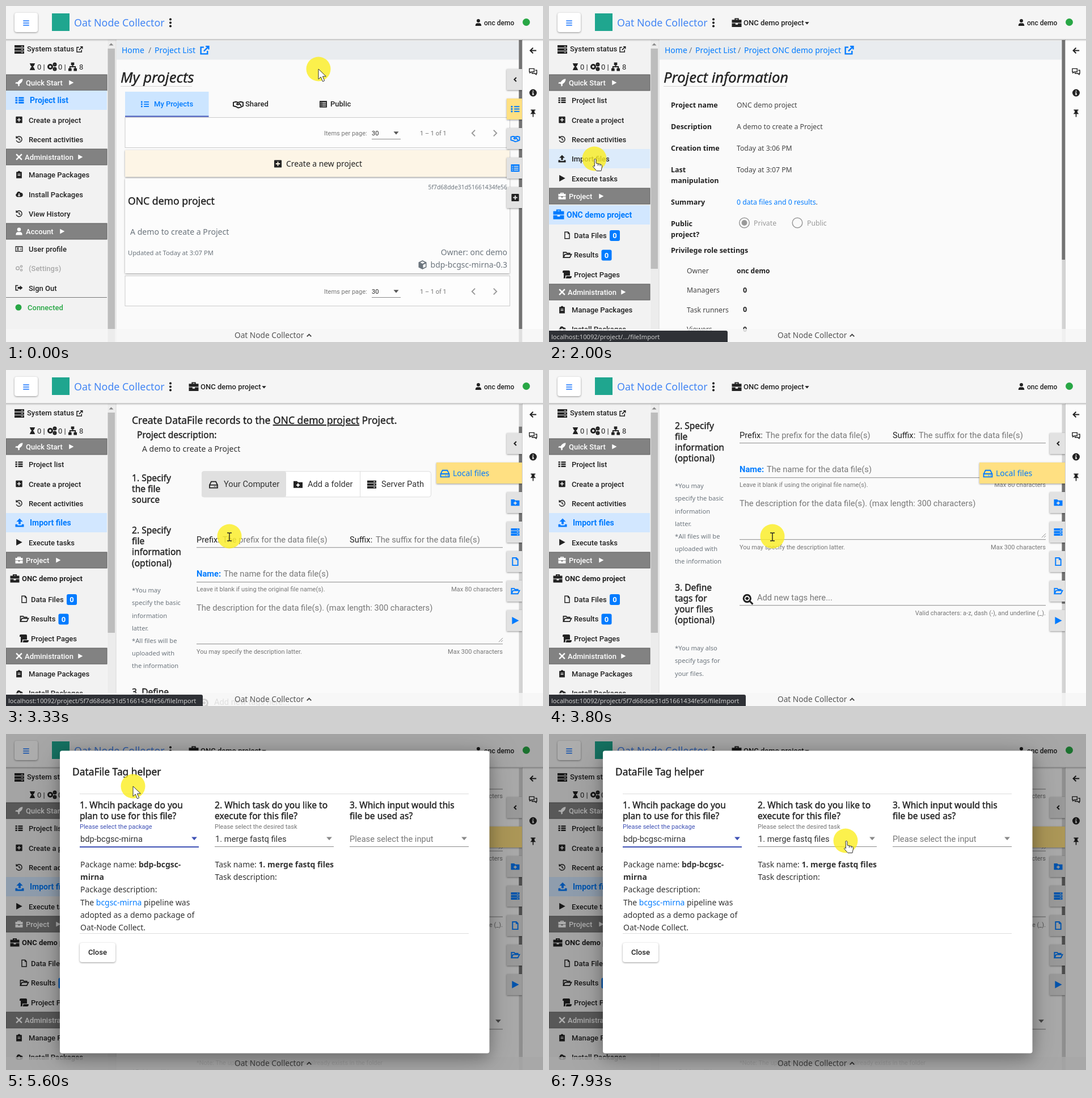
Recreate the animation shown at these times as an HTML page. Size 947x592 px, loop 8000 ms.

```html
<!DOCTYPE html>
<html lang="en">
<head>
<meta charset="utf-8">
<title>Project walkthrough</title>
<style>
html,body{margin:0;width:100%;height:100%;overflow:hidden;background:#fafafa}
svg{display:block;width:947px;height:592px}
text{white-space:pre}
.r{font-family:Roboto,sans-serif}
.n{font-family:'Noto Sans',sans-serif}
.sh{filter:drop-shadow(0 1px 1.5px rgba(0,0,0,.4))}
.deep{filter:drop-shadow(0 7px 12px rgba(0,0,0,.26)) drop-shadow(0 8px 28px rgba(0,0,0,.2))}
</style>
</head>
<body>
<svg id="stage" viewBox="0 0 947 592"></svg>
<script>
const BLUE = '#007bff', INK = '#222', GREY = '#6c757d', INDIGO = '#3f51b5';
const APP = 'Oat Node Collector', USER = 'onc demo', PROJECT = 'ONC demo project';
const STEP = 200 / 3, LOOP = 8000;

// Icons live in a 16 x 16 box
const SOLID = {
  list: 'M0 2h4v3H0zM6 2h10v3H6zM0 6.5h4v3H0zM6 6.5h10v3H6zM0 11h4v3H0zM6 11h10v3H6z',
  ul: 'M0 2h3v3H0zM6 2.5h10v2H6zM0 6.5h3v3H0zM6 7h10v2H6zM0 11h3v3H0zM6 11.5h10v2H6z',
  plus: 'M1 2q0-1 1-1h12q1 0 1 1v12q0 1-1 1H2q-1 0-1-1zM7 4v3H4v2h3v3h2V9h3V7H9V4z',
  clip: 'M2 2h3q1-2 3-2t3 2h3v14H2zM5 6v1.5h6V6zM5 9v1.500h6V9z',
  cloud: 'M4 14a4 4 0 0 1-1-7.5a4.500 4.500 0 0 1 8.500-1.500a4.500 4.500 0 0 1 .5 9zM7 6v4H4.500L8 13l3.500-3H9V6z',
  user: 'M8 0a4 4 0 0 1 0 8a4 4 0 0 1 0-8zM1 16q0-6 4-6.500h6q4 .5 4 6.500z',
  card: 'M0 2h16v12H0zM1.500 4v8.500h13V4zM3 11q0-2 2.500-2t2.500 2zM5.500 5a1.700 1.700 0 0 1 0 3.400a1.700 1.700 0 0 1 0-3.400zM10 6h3.500v1H10zM10 9h3.500v1H10z',
  out: 'M0 2h6v2H2v8h4v2H0zM5 6h5V3l6 5-6 5v-3H5z',
  server: 'M0 1h16v4H0zM0 6h16v4H0zM0 11h16v4H0zM11 2.500v1h3v-1zM11 7.500v1h3v-1zM11 12.500v1h3v-1z',
  hour: 'M2 0h12v2h-1q0 4-3.500 6q3.500 2 3.500 6h1v2H2v-2h1q0-4 3.500-6Q3 6 3 2H2z',
  net: 'M5 0h6v5H9v2h5v4h2v5h-6v-5h2V9H4v2h2v5H0v-5h2V7h5V5H5z',
  rocket: 'M16 0q0 7-7 11v4l-3 1v-4l-2-2H0l1-3h4Q9 0 16 0z',
  upload: 'M6 11V6H2l6-6 6 6h-4v5zM0 11h4v2h8v-2h4v5H0z',
  play: 'M2 1l13 7L2 15z',
  brief: 'M4.500 3V.5h7V3H16v5H0V3zM6.500 3h3v-.8h-3zM0 9h6v2h4V9h6v6H0z',
  scroll: 'M0 3q0-2 2-2h9q2 0 2 2v7H5v3q0 2-2 2t-1-2V5H0zM6.500 11H16q0 4-3 4H5q1.500-1 1.500-4z',
  cube: 'M8 0l7 3.500v9L8 16l-7-3.500v-9zM8 2L4 4l4 2 4-2zM9 8v5.500l4.500-2V6z',
  fplus: 'M0 2h6l2 2h8v10H0zM7 6v2H5v2h2v2h2v-2h2V8H9V6z',
  info: 'M8 0a8 8 0 0 1 0 16a8 8 0 0 1 0-16zM7 3v2.500h2V3zM6 7v1.500h1V11H6v1.500h4V11H9V7z',
  pin: 'M3 0h10v2h-2v4l3 3.500H9V16H7V9.500H2L5 6V2H3z',
  alt: 'M0 1h16v14H0zM2 4v1.500h2V4zM5.500 4v1.500H14V4zM2 7.500V9h2V7.500zM5.500 7.500V9H14V7.500zM2 11v1.500h2V11zM5.500 11v1.500H14V11z',
  down: 'M2 5h12L8 12z'
};
const LINE = {
  ext: 'M7 3H2v11h11V9M10 1.500h5v5M15 1.500L7 9.500',
  hist: 'M3 4a6.300 6.300 0 1 1-1 6M2 1v4h4M8 4.500V8l3 2',
  file: 'M3 1h7l3 3v11H3zM10 1v3h3',
  open: 'M1 13V3h5l1.500 2H13v2M1 13l3-6h12l-3 6z',
  hdd: 'M1 9h14v5H1zM1 9l3-6h8l3 6M9 11.500h1M12 11.500h1',
  hand: 'M0 5l4-1 4 1 4-1 4 1v6l-4 2-4 1-4-2-4-1zM8 5L5.500 8l2 1L10 7l3 4',
  cogs: 'M1.500 8a3.500 3.500 0 1 0 7 0a3.500 3.500 0 1 0-7 0M11 4a2 2 0 1 0 4 0a2 2 0 1 0-4 0M11 12a2 2 0 1 0 4 0a2 2 0 1 0-4 0',
  tools: 'M2 2l12 12M14 2L2 14',
  chat: 'M1 2h9v6H5l-3 2V8H1zM12 5h3v6h-1v2l-3-2H6V9',
  left: 'M15 8H2M8 2L2 8l6 6',
  prev: 'M10 3L5 8l5 5', next: 'M6 3l5 5-5 5', up: 'M2 11l6-6 6 6',
  zoom: 'M1 6.500a5.500 5.500 0 1 0 11 0a5.500 5.500 0 1 0-11 0M10.500 10.500l5 5M4 6.500h5M6.500 4v5',
  bars: 'M1 3h14M1 8h14M1 13h14'
};

const text = (cls, x, y, s, size, fill, w, more) =>
  `<text class="${cls}" x="${x}" y="${y}" font-size="${size}" fill="${fill}" font-weight="${w}" ${more}>${s}</text>`;
const R = (x, y, s, size = 13, fill = INK, w = 500, more = '') => text('r', x, y, s, size, fill, w, more);
const N = (x, y, s, size = 14, fill = INK, w = 400, more = '') => text('n', x, y, s, size, fill, w, more);
// Medium weight: regular with a thin outline
const M = (x, y, s, size, more = '') => N(x, y, s, size, INK, 400, `stroke="${INK}" stroke-width=".4" ${more}`);
const END = 'text-anchor="end"';
const box = (x, y, w, h, fill, more = '') => `<rect x="${x}" y="${y}" width="${w}" height="${h}" fill="${fill}" ${more}/>`;
const rule = (x, y, x2, fill = '#8a8a8a', h = 1) => box(x, y, x2 - x, h, fill);
const dot = (x, y, r, fill, more = '') => `<circle cx="${x}" cy="${y}" r="${r}" fill="${fill}" ${more}/>`;
const group = (id, body, more = '') => `<g id="${id}" ${more}>${body}</g>`;
const lines = (x, y, gap, rows, draw) => rows.map((s, i) => draw(x, y + i * gap, s)).join('');
function icon(name, cx, cy, size = 14, color = INK, sw = 1.8) {
  const at = `transform="translate(${cx - size / 2} ${cy - size / 2}) scale(${size / 16})"`;
  return SOLID[name] ? `<path d="${SOLID[name]}" ${at} fill="${color}" fill-rule="evenodd"/>`
    : `<path d="${LINE[name]}" ${at} fill="none" stroke="${color}" stroke-width="${sw}"/>`;
}

// Sidebar
const item = (y, name, label, color = INK) => icon(name, 23, y, 13, color) + R(40, y + 5, label, 13, color);
const bar = (y, name, label, tip, x = 35) => box(0, y - 14, 178, 28, '#828282', 'stroke="#5d5d5d"') +
  icon(name, 23, y, 13, '#fff', 3) + R(x, y + 5, label, 13, '#fff') + icon('play', tip + 4, y, 10, '#fff');
const active = (y, name, label, bg = '#d2e7ff') => box(0, y - 17, 178, 34, bg) +
  icon(name, 24, y, 15, BLUE) + R(42, y + 5, label, 14, BLUE, 700);
const badge = x => box(x, 395, 18, 19, BLUE, 'rx="3"') + R(x + 9, 409, '0', 13, '#fff', 700, 'text-anchor="middle"');
const quick = item(200.5, 'plus', 'Create a project') + item(235, 'hist', 'Recent activities');

const sideTop = icon('server', 23.5, 76.5, 17) + R(37, 80, 'System status') + icon('ext', 129.500, 76.5, 12, INK, 2) +
  icon('hour', 46.5, 107, 12) + R(55, 112, '0 |', 13, INK, 400) + icon('cogs', 81, 107, 16, INK, 3) +
  R(92, 112, '0 |', 13, INK, 400) + icon('net', 117.5, 107, 15) + R(129, 112, '8', 13, INK, 400) +
  bar(135, 'rocket', 'Quick Start', 111);
const sideList = active(166, 'list', 'Project list') + quick +
  bar(266, 'tools', 'Administration', 127, 33) + item(297, 'clip', 'Manage Packages') +
  item(331.5, 'cloud', 'Install Packages') + item(366, 'hist', 'View History') +
  bar(397, 'user', 'Account', 95) + item(428, 'card', 'User profile') +
  item(462, 'cogs', '(Settings)', '#a9a9a9') + item(496.5, 'out', 'Sign Out') +
  rule(0, 513, 178, '#777') + dot(22, 531, 5.5, '#28a745') + R(38, 536, 'Connected', 13, '#28a745') +
  box(179.500, 75, 12.5, 517, '#bdbdbd');
const sideProject = item(166, 'list', 'Project list') + quick +
  item(303.5, 'play', 'Execute tasks') + bar(335, 'brief', 'Project', 88) +
  icon('file', 32, 404, 13) + R(44, 409, 'Data Files') + badge(107) +
  icon('open', 32, 438.5, 15) + R(44, 443, 'Results') + `<g transform="translate(0 34.500)">${badge(92.500)}</g>` +
  icon('scroll', 32, 473, 16) + R(44, 477.5, 'Project Pages') +
  bar(504, 'tools', 'Administration', 127, 33) + item(535, 'clip', 'Manage Packages') + item(569, 'cloud', 'Install Packages') +
  box(179.500, 75, 12.5, 388, '#bdbdbd');
const sideInfo = group('hover', box(0, 252, 178, 34, '#dcebfb')) + item(269, 'upload', 'Import files') +
  box(0, 351, 178, 34, '#d2e7ff') + icon('brief', 17, 367.5, 19, BLUE) + R(31, 373, PROJECT, 14, BLUE, 700);
const sideImport = active(269, 'upload', 'Import files', '#d2e7ff" id="lit') +
  icon('brief', 15.5, 367.5, 16) + R(28, 372, PROJECT, 13, INK, 700);

// Pages
const crumbs = (parts, extX) => box(195, 62, 710, 32.5, '#e9ecef') +
  parts.map(([x, s], i) => (i ? N(x - 11, 83, '/', 14, GREY) : '') + N(x, 83, s, 14, BLUE)).join('') +
  icon('ext', extX, 78, 17, BLUE, 2.2);
const heading = (x, y, s, end) => M(x, y, s, 25.6, 'font-style="italic"') + rule(x, y + 6, end, '#d5d5d5');
const pager = y => box(210, y, 678.500, 53, '#fdfdfd', 'stroke="#ccc"') + R(561, y + 31, 'Items per page:', 11, '#757575', 400) +
  R(645, y + 31, '30', 11, INK, 400) + rule(645, y + 37.5, 696) + icon('down', 688, y + 27, 12, '#555') +
  R(730, y + 31, '1 – 1 of 1', 11, '#757575', 400) + icon('prev', 825, y + 27.5, 17, '#999') + icon('next', 862, y + 27.5, 17, '#999');

const pageList = crumbs([[204, 'Home'], [262, 'Project List']], 350) + heading(202, 135, 'My projects', 328) +
  box(210, 151, 147.5, 44, '#cce5ff') + rule(210, 193.5, 357.5, INDIGO, 2) +
  icon('ul', 245, 173, 14, BLUE) + R(261, 177, 'My Projects', 13, BLUE) +
  icon('hand', 409.5, 173, 17) + R(422, 177, 'Shared') + icon('alt', 559.5, 173, 13) + R(572, 177, 'Public') + pager(196.5) +
  box(210, 254, 678, 47, '#fdf5e6', 'class="sh"') + icon('plus', 479.5, 278, 15) + N(494, 283, 'Create a new project', 13.9) +
  box(210, 304, 678, 167, '#fcfcfc', 'class="sh"') + N(884, 323, '5f7d68dde31d51661434fe56', 10.4, GREY, 400, END) +
  M(215, 350, PROJECT, 17.6) + N(219, 403, 'A demo to create a Project', 14.1, GREY) +
  N(215, 439, 'Updated at Today at 3:07 PM', 11.2, GREY) + N(884, 439, 'Owner: ' + USER, 14, GREY, 400, END) +
  N(884, 461, 'bdp-bcgsc-mirna-0.3', 14, GREY, 400, END) + icon('cube', 734.5, 456, 16, GREY) + pager(475.5);

const label = (x, y, s) => N(x, y, s, 12.5, INK, 600);
const value = (x, y, s, c = '#444') => N(x, y, s, 12.25, c);
const radio = x => dot(x, 382, 8.8, 'none', 'stroke="#999" stroke-width="1.5"');
const pageInfo = crumbs([[204, 'Home'], [258, 'Project List'], [344, 'Project ' + PROJECT]], 529) +
  heading(202, 135, 'Project information', 418) +
  lines(215, 179, 38, ['Project name', 'Description', 'Creation time', 'Last'], label) + label(215, 312, 'manipulation') +
  lines(331, 179, 38, [PROJECT, 'A demo to create a Project', 'Today at 3:06 PM', 'Today at 3:07 PM'], value) +
  label(215, 350, 'Summary') + value(331, 350, '0 data files and 0 results<tspan fill="#444">.</tspan>', BLUE) +
  label(215, 388, 'Public') + label(215, 407, 'project?') + radio(344.500) + dot(344.500, 382, 5, '#999') +
  value(361, 387, 'Private', '#999') + radio(438) + value(455, 387, 'Public', '#999') +
  label(215, 435, 'Privilege role settings') +
  lines(243, 471, 34.4, ['Owner', 'Managers', 'Task runners', 'Viewers'], (x, y, s) => value(x, y, s)) +
  N(331, 470.5, USER, 12, INK, 600) + lines(342, 505, 34.4, ['0', '0', '0'], label);

const step = (y, rows) => lines(222, y, 19.1, rows, (x, y, s) => M(x, y, s, 15.6));
const note = (y, rows) => lines(222, y, 22.2, rows, (x, y, s) => N(x, y, s, 11.15, GREY));
const field = (x, y, s) => R(x, y, s, 14.7, '#777', 400);
const hint = (y, s, right) => R(336, y, s, 11, '#777', 400) + R(876, y, right, 11, '#777', 400, END);
const choice = (ix, x, name, s) => icon(name, ix, 295.5, 16) + R(x, 300, s, 14.7, '#333', 400);
const pageImport = crumbs([[204, 'Home'], [258, 'Project List'], [344, 'Project : ' + PROJECT], [535, 'Import Files']], 628) +
  heading(208, 143, 'Import Files', 340) +
  M(222, 189, `Create DataFile records to the <tspan text-decoration="underline">${PROJECT}</tspan> Project.`, 17.5) +
  M(231, 214, 'Project description:', 15.5) + N(240, 238, 'A demo to create a Project', 14, '#333') +
  step(290, ['1. Specify', 'the file', 'source']) +
  box(345.500, 272.5, 404, 45, '#fff', 'rx="4" stroke="#ddd"') + box(345, 272, 149, 46, '#e0e0e0', 'rx="4"') + box(624, 272, 1, 46, '#ddd') +
  choice(366, 384, 'hdd', 'Your Computer') + choice(515, 532, 'fplus', 'Add a folder') + choice(645, 662, 'server', 'Server Path') +
  step(382, ['2. Specify', 'file', 'information', '(optional)']) +
  R(336, 398, 'Prefix:', 14.7, INK, 400) + field(382, 398, 'The prefix for the data file(s)') +
  R(606, 398, 'Suffix:', 14.7, INK, 400) + field(652, 398, 'The suffix for the data file(s)') + rule(336, 406, 876) +
  R(336, 458, 'Name:', 14.7, BLUE, 700) + field(384, 458, 'The name for the data file(s)') + rule(336, 467, 876) +
  hint(483.5, 'Leave it blank if using the original file name(s).', 'Max 80 characters') +
  note(486, ['*You may', 'specify the basic', 'information', 'latter.', '*All files will be', 'uploaded with', 'the information']) +
  field(336, 518, 'The description for the data file(s). (max length: 300 characters)') + rule(336, 576, 876) +
  '<path d="M869 573l7-7M873 573l3-3" stroke="#888"/>' + hint(593.5, 'You may specify the description latter.', 'Max 300 characters') +
  step(667, ['3. Define', 'tags for', 'your files', '(optional)']) + icon('zoom', 351, 682, 18, INK, 2.6) +
  group('press', box(335.500, 668.5, 28, 24, '#d8d00055', 'stroke="#776"')) +
  field(367, 684, 'Add new tags here...') + rule(336, 692, 876) +
  hint(710, '', 'Valid characters: a-z, dash (-), and underline (_).') + note(772, ['*You may also', 'specify tags for', 'your files.']) +
  step(864, ['4. Set a', 'folder to', 'upload', '(optional)']) + field(336, 881, 'select a folder to import') +
  icon('down', 868, 876, 13, '#666') + rule(336, 890, 876) + box(336, 913, 14.5, 14.5, '#aaa', 'rx="2"') +
  '<path d="M339 920l3.500 3.500 6-7" fill="none" stroke="#fff" stroke-width="2"/>' +
  R(358, 925, 'Keep the underlying filename in the folder', 14.7, '#666', 400) +
  hint(953, '*Note: The upload will fail if the filename already exists in the folder', '') + note(969, ['*Folder will be']);

// Tabs on the right edge
const tab = (i, name, color = BLUE, bg = '#e2e2e2') => box(883, 111 + i * 52, 28, 37, bg, 'class="sh"') + icon(name, 898, 129.5 + i * 52, 15, color, 2);
const back = box(883, 111, 28, 37, '#e2e2e2', 'class="sh"') + icon('prev', 898.5, 129.5, 11, INK, 3);
const tabsList = back + tab(1, 'ul', BLUE, '#ffe082') + tab(2, 'hand') + tab(3, 'alt') + tab(4, 'plus', INK);
const tabsImport = back + box(759, 163, 190, 37, '#ffe082', 'class="sh"') + icon('hdd', 774, 182, 17, BLUE) +
  N(788, 187, 'Local files', 14, BLUE) + ['fplus', 'server', 'file', 'open', 'play'].map((n, i) => tab(i + 2, n)).join('');

const header = box(-5, -5, 957, 63.5, '#f5f5f5', 'class="sh"') + box(15, 12, 41, 34, '#fff', 'rx="4" class="sh"') +
  icon('bars', 35.5, 30, 12, '#0d6efd', 2) + box(81, 13, 31, 31, '#1fa68f') + N(120, 36, APP, 17.85, '#4285f4') +
  [23.5, 29.5, 35.5].map(y => dot(290, y, 2, '#111')).join('') +
  group('menu', icon('brief', 331, 29.5, 17) + R(343, 34, PROJECT) + icon('down', 455, 30, 10)) +
  icon('user', 833, 29, 12) + R(843, 33.5, USER, 12) + dot(917.5, 28.5, 6.5, '#28a745');

// Dialog
const select = (x, color, h) => icon('down', x + 202, 184, 13, color) + rule(x, 198, x + 210, color, h);
const body = (x, y, s) => N(x, y, s, 13.95, '#333');
const small = (x, s, c) => R(x, 167, s, 11, c, 400);
const pick = (x, s) => R(x, 190, s, 14.7, '#333', 400);
const dialog = box(95, 29.5, 757.500, 533, '#fff', 'rx="4" class="deep"') + M(117, 73, 'DataFile Tag helper', 17.35) +
  rule(130, 105, 816, '#ddd') + rule(130, 351, 816, '#ddd') +
  [[130, '1. Whcih package do you', 'plan to use for this file?'], [368, '2. Which task do you like to', 'execute for this file?'],
    [606, '3. Which input would this', 'file be used as?']]
    .map(([x, a, b]) => lines(x, 130.5, 19, [a, b], (x, y, s) => M(x, y, s, 15.6))).join('') +
  select(130, INDIGO, 2) + select(368, '#8a8a8a', 1) + select(606, '#8a8a8a', 1) + field(606, 190, 'Please select the input') +
  group('pack0', field(130, 190, 'Please select the package')) +
  group('pack1', small(130, 'Please select the package', INDIGO) + pick(131, 'bdp-bcgsc-mirna') +
    lines(131, 235, 22.2, ['Package name: <tspan font-weight="600">bdp-bcgsc-</tspan>', '<tspan font-weight="600">mirna</tspan>', 'Package description:',
      `The <tspan fill="${BLUE}">bcgsc-mirna</tspan> pipeline was`, 'adopted as a demo package of', 'Oat-Node Collect.'], body)) +
  group('task0', field(368, 190, 'Please select the desired task')) +
  group('task1', small(368, 'Please select the desired task', '#777') + pick(369, '1. merge fastq files') +
    lines(368.5, 235, 22.2, ['Task name: <tspan font-weight="600">1. merge fastq files</tspan>', 'Task description:'], body)) +
  box(130, 368, 63, 34, '#fff', 'rx="4" class="sh"') + R(145, 389, 'Close');

const pointer = dot(0, 0, 21.5, '#fcee21', 'opacity=".8"') + group('ring', dot(0, 0, 7, 'none', 'stroke="#f0402c" stroke-width="3"')) +
  '<path id="arrow" d="M0 0v18l4.200-4 3.300 8 3.200-1.400-3.300-7.600h6z" fill="#fff" stroke="#333"/>' +
  '<path id="beam" d="M-4-6h3l1 1 1-1h3M-4 8h3l1-1 1 1h3M0-5V7" fill="none" stroke="#222" stroke-width="1.4"/>' +
  '<path id="hand" d="M0 1q2-1.500 3 .5V8l8 2q3 .8 2.500 4l-1.500 7.500H4L-2.500 14q1-3 3-.5z" fill="#fff" stroke="#333"/>' +
  '<path id="knuckles" d="M6.500 9v3.500M10 10v3" stroke="#333"/>';

const $ = id => document.getElementById(id);
$('stage').innerHTML =
  '<clipPath id="view"><path d="M195 60h715v532H195z"/></clipPath>' +
  box(0, 0, 947, 592, '#fafafa') + box(0, 59, 178.500, 533, '#f2f2f2') + box(179, 59, 14.5, 533, '#ececec') + box(193.5, 59, 1, 533, '#d6d6d6') +
  '<path d="M181.500 69.500h8l-4-4z" fill="#888"/>' + sideTop + group('sideList', sideList) + group('sideProject', sideProject) +
  group('sideInfo', sideInfo) + group('sideImport', sideImport) +
  `<g clip-path="url(#view)">${group('pageList', pageList) + group('pageInfo', pageInfo) + group('pageImport', pageImport)}` +
  box(904.500, 59, 5.5, 533, '#d4d4d4') + box(904.500, 59, 5.5, 533, '#737373', 'id="thumb"') +
  group('tabsList', tabsList) + group('tabsImport', tabsImport) + '</g>' +
  box(910, 59, 37, 533, '#fcfcfc') + box(910, 59, 1, 533, '#ccc') +
  icon('left', 929.5, 78.5, 13, INK, 2.6) + icon('chat', 929.5, 116, 15, INK, 1.5) + icon('info', 929.5, 153, 13) + icon('pin', 929.5, 189, 13) +
  header + box(0, 569, 947, 23, '#f7f7f7', 'opacity=".82"') + N(403, 585, APP, 13.7, '#555') + icon('up', 534.5, 580.5, 10, '#444', 3) +
  group('status', box(-4, 572, 1, 24, '#2f3136', 'rx="3" id="statusBox"') + N(4, 587, '', 11.1, '#ccc', 400, 'id="statusText"')) +
  box(0, 0, 947, 592, '#000', 'id="shade"') + group('dialog', dialog) + group('pointer', pointer);

// [time, x, y]
const PATH = [[200, 551, 111], [500, 440, 290], [667, 402, 342], [1267, 402, 342], [1900, 80, 269], [2330, 80, 269],
  [2667, 354, 267], [2933, 379, 266], [3067, 379, 266], [3330, 394, 293], [3930, 394, 293], [4330, 351, 309], [4730, 351, 309],
  [5000, 240, 187], [5130, 240, 187], [5330, 450, 187], [5400, 450, 187], [5600, 224, 92], [5667, 215, 112], [5800, 262, 195],
  [6000, 262, 195], [6330, 335, 187], [6667, 136, 203], [6800, 136, 203], [7130, 250, 70], [7470, 490, 84], [7667, 449, 114], [7930, 523, 188]];
const KINDS = [[0, 'arrow'], [530, 'hand'], [930, 'beam'], [1400, 'arrow'], [1800, 'hand'], [2460, 'arrow'], [3200, 'beam'], [4190, 'hand'],
  [4790, 'arrow'], [4920, 'hand'], [5460, 'arrow'], [5730, 'hand'], [6920, 'arrow'], [7790, 'hand']];
const CLICKS = [720, 2260, 4600, 5060, 5330];
const clamp = v => Math.max(0, Math.min(1, v));
const ease = v => { v = clamp(v); return v * v * (3 - 2 * v); };
const show = (id, on) => $(id).setAttribute('display', on ? 'inline' : 'none');

function spot(t) {
  const i = PATH.findIndex(p => p[0] > t);
  if (i < 0) return PATH[PATH.length - 1].slice(1);
  if (!i) return PATH[0].slice(1);
  const [a, b] = [PATH[i - 1], PATH[i]], k = ease((t - a[0]) / (b[0] - a[0]));
  return [a[1] + (b[1] - a[1]) * k, a[2] + (b[2] - a[2]) * k];
}

function draw(t) {
  const page = t < 860 ? 'List' : t < 2460 ? 'Info' : 'Import';
  for (const p of ['List', 'Info', 'Import']) {
    show('side' + p, p === page);
    show('page' + p, p === page);
  }
  show('sideProject', page !== 'List');
  show('menu', t > 1060);
  show('hover', t > 1790);
  $('lit').setAttribute('fill', t < 2720 ? '#bcdcff' : '#d2e7ff');

  // Four wheel notches
  const scroll = 92.6 * [3080, 3320, 3560, 3940].reduce((s, at) => s + ease((t - at) / 200), 0);
  $('pageImport').setAttribute('transform', `translate(0 ${-scroll})`);
  $('thumb').setAttribute('y', 59 + scroll * .435);
  $('thumb').setAttribute('height', { List: 533, Info: 388, Import: 232 }[page]);
  show('tabsList', page === 'List');
  show('tabsImport', page === 'Import');
  $('tabsImport').setAttribute('transform', `translate(${t < 2720 ? 37 : 0} 0)`);
  show('press', t > 4320 && t < 4790);

  const long = t > 3130;
  show('status', t > 1860 && t < 4720);
  $('statusBox').setAttribute('width', long ? 351 : 319);
  $('statusText').textContent = `localhost:10092/project/${long ? '5f7d68dde31d51661434fe56' : '...'}/fileImport`;

  show('shade', t > 4720);
  $('shade').setAttribute('opacity', .32 * clamp((t - 4660) / 140));
  show('dialog', t > 4790);
  const pack = t > 5120, task = t > 5390;
  show('pack0', !pack); show('pack1', pack);
  show('task0', !task); show('task1', task);

  const kind = KINDS.filter(k => k[0] <= t).pop()[1];
  for (const k of ['arrow', 'beam', 'hand']) show(k, k === kind);
  show('knuckles', kind === 'hand');
  show('ring', CLICKS.some(c => t >= c && t < c + 130));
  $('pointer').setAttribute('transform', `translate(${spot(t)})`);
}

const start = performance.now();
function tick() {
  const t = (performance.now() - start) % LOOP;
  draw(Math.floor((t + 5) / STEP) * STEP);
  requestAnimationFrame(tick);
}
tick();
</script>
</body>
</html>
```
